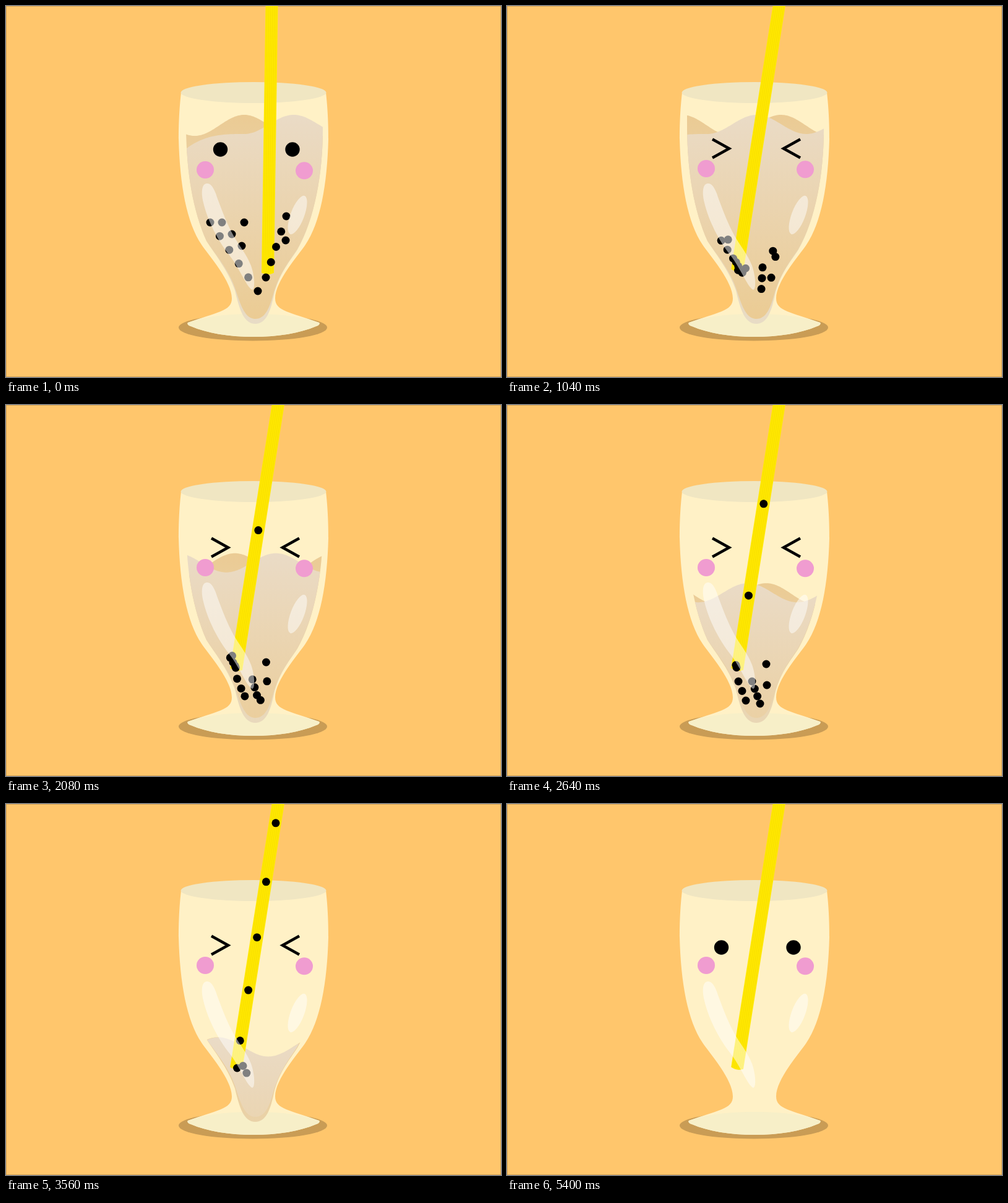
Animation, 800 px wide and 600 px high, one loop 5.44 s. Source, as an HTML page with a canvas:

```html
<!DOCTYPE html>
<html lang="en">
<head>
<meta charset="utf-8">
<title>Bubble tea</title>
<style>
html, body { margin: 0; width: 100%; height: 100%; overflow: hidden; background: #ffc66c; }
canvas { display: block; }
</style>
</head>
<body>
<canvas id="stage" width="800" height="600"></canvas>
<script>
const ctx = document.getElementById('stage').getContext('2d');
const LOOP = 5440, STEP = 40;
const SUCK_START = 1040, SUCK_END = 4880, SETTLED = 2640;
const RISE = 0.8;
const strawX = y => 441 - 0.164 * y;
const MOUTH = [strawX(425), 425];

const FOOT = 'C292 514 295 517 299 518 C325 529 360 535 400 535 C440 535 475 529 501 518 C505 517 508 514 506 512';
const glass = new Path2D('M283 140 C279 175 279 205 279 215 C281 290 292 350 316 386 ' +
  'C328 404 365 445 365 473 C365 494 340 495 294 512 ' + FOOT +
  ' C460 495 435 494 435 473 C435 445 472 404 484 386 C508 350 519 290 521 215 C521 205 521 175 517 140Z');
const foot = new Path2D('M294 512 ' + FOOT + ' C470 500 435 498 400 498 C365 498 330 500 294 512Z');
const SIDE = 'M291 150 L291 200 C292 270 302 330 324 380 ';
const SIDE_END = 'C499 345 512 270 512 200 L512 150Z';
const outer = new Path2D(SIDE + 'C336 400 358 425 370 460 C377 490 384 514 403 514 ' +
  'C421 514 428 492 433 467 C441 435 455 418 471 394 ' + SIDE_END);
const inner = new Path2D(SIDE + 'C340 404 362 428 372 462 C380 486 387 506 403 506 ' +
  'C419 506 426 488 432 466 C442 432 458 412 470 394 ' + SIDE_END);
const shine = new Path2D('M325 287 C316 287 315 302 319 318 C326 348 343 380 361 403 ' +
  'C378 425 389 455 398 459 C403 458 402 437 396 420 C388 400 377 388 368 372 ' +
  'C357 352 350 333 342 312 C338 299 333 287 325 287Z');

const mix = (a, b, p) => a + (b - a) * p;
const ease = p => (1 - Math.cos(Math.PI * Math.min(1, Math.max(0, p)))) / 2;

// Liquid surface: depth below the crest, level and travel of the two waves
const WAVE = 160;
const swell = (x, crest, height) => height / 2 * (1 - Math.cos(2 * Math.PI * (x - crest) / WAVE));
const frontWave = x => x < 385 ? 31 + 24 * ((385 - x) / 94) ** 3 : swell(x, 465, 31);
const backWave = x => x > 465 ? 34 : swell(x, 385, 34);
const level = t => 176 + 340 * Math.max(0, (t - 1100) / 3740) ** 1.25;
const frontShift = s => 340 * s ** 2.5 / (s ** 2.5 + 5);
const backShift = s => 93 * s * s / (s + 0.7);

// Pearls start in a loose V, settle at the bottom and leave one by one
const row = (n, x0, y0, x1, y1) =>
  Array.from({ length: n }, (_, i) => [mix(x0, x1, i / (n - 1)), mix(y0, y1, i / (n - 1))]);
const starts = [...row(6, 407, 461, 330, 350), ...row(3, 349, 350, 381, 388),
  ...row(2, 385, 350, 452, 379), ...row(5, 420, 439, 453, 340)];
const rests = [...row(3, 374, 447, 386, 478), ...row(4, 409, 483, 396, 447), ...row(2, 419, 419, 420, 453)];
const early = starts.length - rests.length;
const pearls = starts.map((start, k) => ({ start, rest: rests[k - early], leave: 1110 + 692 * Math.sqrt(k) }));

function fill(path, color) {
  ctx.fillStyle = color;
  ctx.fill(path);
}

function oval(x, y, rx, ry, color, turn = 0) {
  ctx.beginPath();
  ctx.ellipse(x, y, rx, ry, turn, 0, 2 * Math.PI);
  ctx.fillStyle = color;
  ctx.fill();
}

function liquid(clip, wave, shift, top, from, to) {
  const shade = ctx.createLinearGradient(0, top, 0, top + 340);
  shade.addColorStop(0, from);
  shade.addColorStop(1, to);
  ctx.save();
  ctx.clip(clip);
  ctx.beginPath();
  ctx.moveTo(288, 600);
  for (let x = 288; x <= 516; x += 2) ctx.lineTo(x, top + wave(x + shift));
  ctx.lineTo(516, 600);
  ctx.fillStyle = shade;
  ctx.fill();
  ctx.restore();
}

function straw(t) {
  ctx.save();
  ctx.translate(428.4, 71.6);
  ctx.rotate(mix(0.86, 9, ease(t / 1020)) * Math.PI / 180);
  ctx.fillStyle = '#ffe800';
  ctx.beginPath();
  ctx.moveTo(-10, -100);
  ctx.lineTo(10, -100);
  ctx.lineTo(10, 360);
  ctx.quadraticCurveTo(0, 365, -10, 360);
  ctx.fill();
  ctx.fillStyle = 'rgba(225, 195, 0, .3)';
  for (let x = -8; x < 10; x += 3) ctx.fillRect(x, -100, 0.8, 460);
  ctx.restore();
}

function face(t) {
  const sucking = t >= SUCK_START && t < SUCK_END;
  let y = t < SUCK_START ? 265 : 261;
  if (sucking && t < SUCK_END - STEP && t / STEP % 2 === 0) y = 263;
  oval(322, y, 14, 14, '#f09cd0');
  oval(482, y + 1.3, 14, 14, '#f09cd0');
  if (sucking) {
    ctx.beginPath();
    for (const [x, dir] of [[332, 1], [474, -1]]) {
      ctx.moveTo(x, y - 47.5);
      ctx.lineTo(x + 27 * dir, y - 32.5);
      ctx.lineTo(x, y - 17.5);
    }
    ctx.lineWidth = 4.5;
    ctx.strokeStyle = '#000';
    ctx.stroke();
    return;
  }
  const look = t < SUCK_START ? ease(t / 700) : 0;
  const blink = t > 5040 && t < 5400 ? 1 - 0.9 * Math.sin(Math.PI * (t - 5040) / 360) : 1;
  for (const x of [346.5, 463]) oval(x + 14.8 * look, 232 - 17.3 * look, 11.7, 11.7 * blink, '#000');
}

function pearlAt({ start, rest, leave }, t) {
  if (t >= leave) {
    const y = MOUTH[1] - (t - leave) * RISE;
    return [strawX(y), y];
  }
  const move = (a, b, p) => [mix(a[0], b[0], p), mix(a[1], b[1], p)];
  if (!rest) return move(start, MOUTH, t / leave);
  if (t < SETTLED) return move(start, rest, Math.sin(t / SETTLED * Math.PI / 2));
  return move(rest, MOUTH, ((t - SETTLED) / (leave - SETTLED)) ** 2);
}

function draw() {
  const t = Math.floor(performance.now() % LOOP / STEP) * STEP;
  const top = level(t), s = t / 1000;
  ctx.fillStyle = '#ffc66c';
  ctx.fillRect(0, 0, 800, 600);
  ctx.lineWidth = 1;
  ctx.strokeStyle = '#d3a259';
  ctx.strokeRect(0.5, 0.5, 799, 599);

  oval(399, 520, 120, 21.5, '#c99c55');
  fill(glass, '#fff1c6');
  fill(foot, '#f7efc8');
  oval(400, 140, 117.5, 17, '#f0e6c2');
  liquid(outer, backWave, -backShift(s), top, '#ebcb94', '#e8dcc6');
  liquid(inner, frontWave, frontShift(s), top, '#eadbc6', '#ebcb92');
  face(t);
  straw(t);
  for (const pearl of pearls) oval(...pearlAt(pearl, t), 6.5, 6.5, '#000');
  fill(shine, 'rgba(255, 255, 255, .5)');
  oval(471, 338, 11, 33, 'rgba(255, 255, 255, .5)', 0.36);
  requestAnimationFrame(draw);
}
draw();
</script>
</body>
</html>
```
